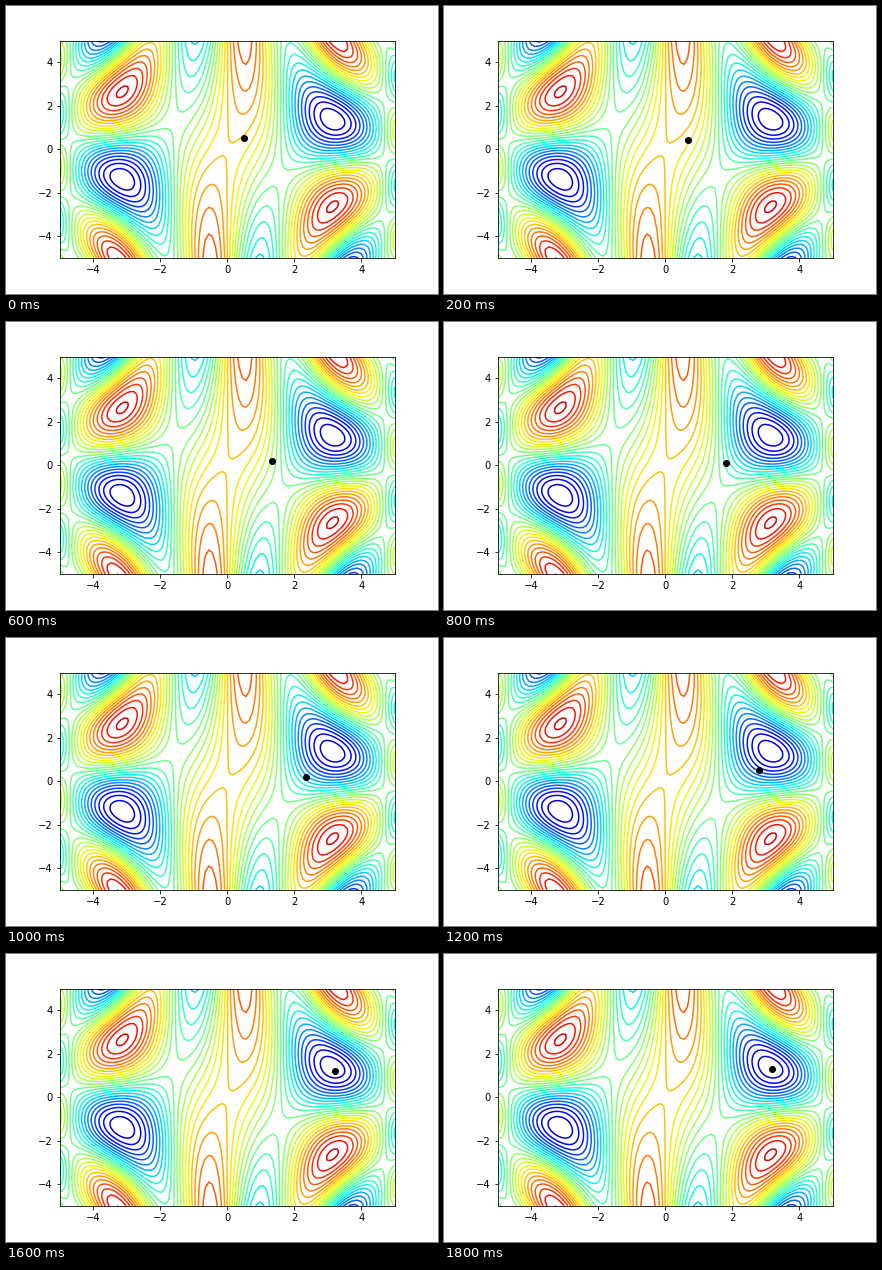
A matplotlib script that plays this animation: 432 px wide and 288 px high, repeating every 2 s.

```python
import numpy as np
import matplotlib.pyplot as plt
from matplotlib.animation import FuncAnimation

STEPS = 10
RATE = 1.0


def f(x, y):
    return np.cos(x) * np.sin(x * y / 4 + 0.5)


def grad(p):
    x, y = p
    u = x * y / 4 + 0.5
    dx = -np.sin(x) * np.sin(u) + np.cos(x) * np.cos(u) * y / 4
    dy = np.cos(x) * np.cos(u) * x / 4
    return np.array([dx, dy])


def descend(start, n):
    path = [np.array(start)]
    while len(path) < n:
        path.append(path[-1] - RATE * grad(path[-1]))
    return path


path = descend((0.5, 0.5), STEPS)

fig, ax = plt.subplots(figsize=(6, 4), dpi=72)
fig.subplots_adjust(left=0.125, right=0.9, bottom=0.125, top=0.88)

axis = np.linspace(-5, 5, 100)
X, Y = np.meshgrid(axis, axis)
ax.contour(X, Y, f(X, Y), levels=np.linspace(-1.1, 1.15, 28), cmap="jet")
dot, = ax.plot([], [], "ko", markersize=6)
ax.set(xlim=(-5, 5), ylim=(-5, 5),
       xticks=range(-4, 5, 2), yticks=range(-4, 5, 2))


def update(i):
    x, y = path[i]
    dot.set_data([x], [y])
    return dot,


anim = FuncAnimation(fig, update, frames=STEPS, interval=200, repeat=True)
plt.show()
```
